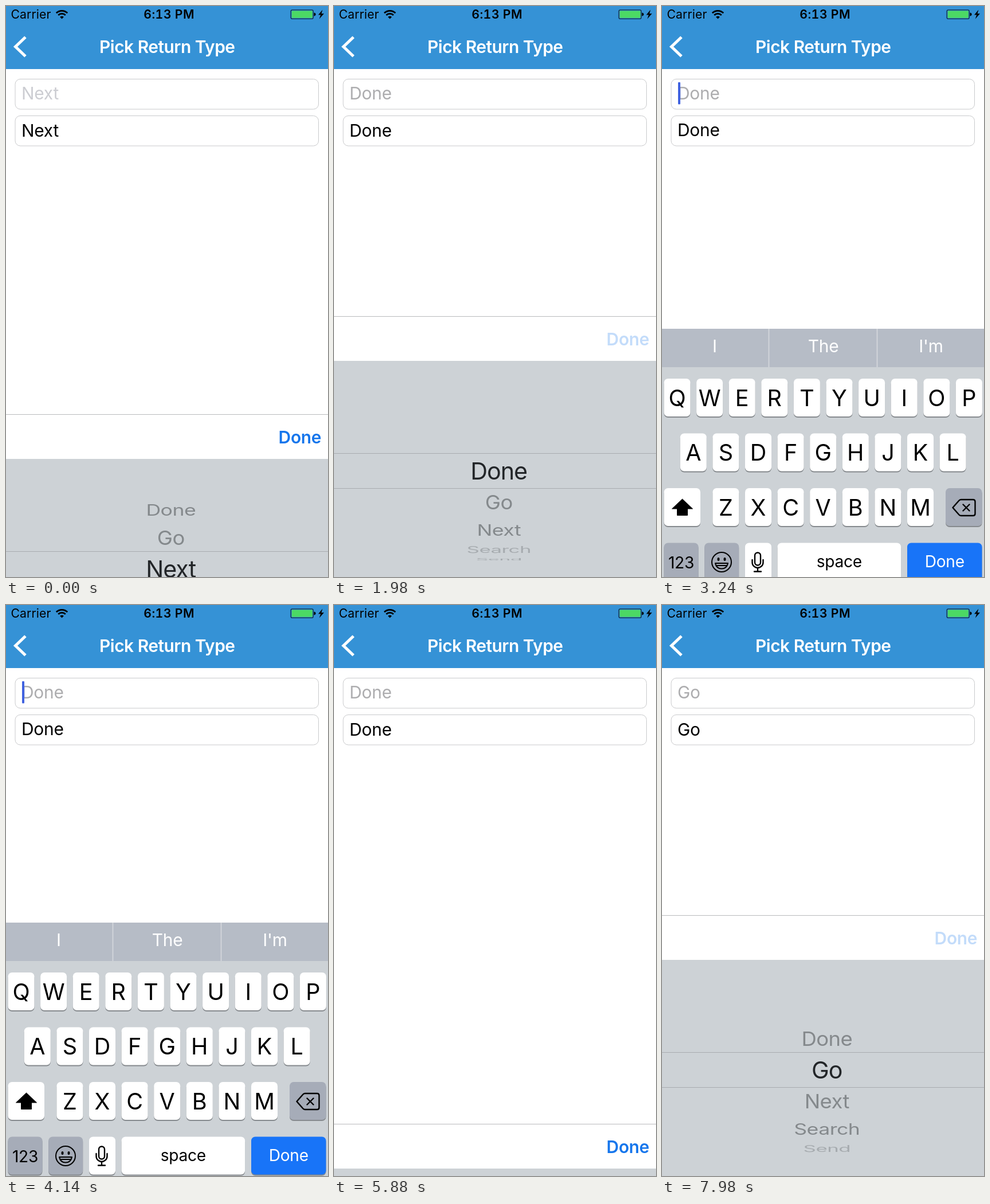
Write an HTML page that moves like this. It is 562x996 px and loops after 8 s.

```html
<!DOCTYPE html>
<html lang="en">
<head>
<meta charset="utf-8">
<title>Pick Return Type</title>
<style>
  html, body { margin: 0; width: 100%; height: 100%; overflow: hidden; background: #fff; }
  svg { display: block; width: 100vw; height: 100vh; font-family: Inter, Roboto, sans-serif; }
  text { font-size: 29.9px; letter-spacing: -.25px; white-space: pre; }
  .mid { text-anchor: middle; }
  .bold { font-weight: 600; }
  .line { fill: none; stroke: #000; stroke-width: 2.4; stroke-linecap: round; stroke-linejoin: round; }
  .field { fill: #fff; stroke: #c9cacc; }
  .wheel text { font-size: 41.2px; letter-spacing: -.6px; fill: #222528; text-anchor: middle; }
  #band text { letter-spacing: -1px; }
  .letter { font-size: 39.5px; letter-spacing: 0; text-anchor: middle; }
  .word { font-size: 28.1px; text-anchor: middle; }
</style>
</head>
<body>
<svg id="stage" viewBox="0 0 562 996" preserveAspectRatio="none">
  <defs>
    <clipPath id="bandClip"><rect y="240" width="562" height="60"/></clipPath>
    <clipPath id="drumClip"><path d="M0 79H562V239H0ZM0 301H562V470H0Z"/></clipPath>
  </defs>
  <rect width="562" height="996" fill="#fff"/>

  <rect width="562" height="110" fill="#3592d6"/>
  <text x="8.5" y="22.3" style="font-size:21.2px;letter-spacing:.1px">Carrier</text>
  <g fill="none" stroke="#000" stroke-width="2.8">
    <path d="M87.8 12.2A14 14 0 0 1 107.2 12.2"/>
    <path d="M91.2 16A9 9 0 0 1 103.8 16"/>
    <path d="M97.5 22.6L94.2 19.2A4.7 4.7 0 0 1 100.8 19.2Z" fill="#000" stroke="none"/>
  </g>
  <text class="mid bold" x="284.6" y="22.3" style="font-size:21.2px;letter-spacing:.4px;font-variant-numeric:tabular-nums">6:13 PM</text>
  <rect x="497.2" y="6.8" width="39" height="15.6" rx="2.5" fill="none" stroke="#122c40" stroke-width="1.3"/>
  <rect x="498.8" y="8.4" width="36" height="12.4" rx="1" fill="#4cd964"/>
  <path d="M537.5 11.5Q540.5 12 540.5 14.6T537.5 17.7Z"/>
  <path d="M552.5 6.5L545 15.6H549.2L546.8 22.6L555 13.2H550.5Z"/>
  <path d="M34 54.3L16.5 71L34 87.7" fill="none" stroke="#fff" stroke-width="5"/>
  <text class="mid bold" x="281.3" y="81.5" fill="#fff" style="letter-spacing:-.5px">Pick Return Type</text>

  <rect class="field" x="16" y="127.5" width="529.5" height="52.5" rx="9"/>
  <rect class="field" x="16" y="191.5" width="529.5" height="52.5" rx="9"/>
  <text id="placeholder" x="27" y="163.3"></text>
  <text id="value" x="27"></text>
  <rect id="caret" x="28" y="133" width="4" height="38.5" rx="1" fill="#4062e0"/>

  <g id="picker">
    <rect width="562" height="79" fill="#fff"/>
    <rect width="562" height="1" fill="#b9bbbd"/>
    <text id="doneButton" class="bold" x="550.3" y="50.5" text-anchor="end" fill="#1676ec">Done</text>
    <rect y="78" width="562" height="460" fill="#cdd2d6"/>
    <path d="M0 239.5H562M0 300.5H562" stroke="#a8acb0"/>
    <g class="wheel" id="drum" clip-path="url(#drumClip)"></g>
    <g class="wheel" id="band" clip-path="url(#bandClip)"></g>
  </g>

  <g id="keyboard">
    <rect width="562" height="450" fill="#cdd2d6"/>
    <rect width="562" height="67" fill="#b6bcc6"/>
    <path d="M186.5 0V67M375.5 0V67" stroke="#d6d9de" stroke-width="1.6"/>
    <g class="mid" fill="#fff">
      <text x="92" y="41.3">I</text><text x="281.5" y="41.3">The</text><text x="469.5" y="41.3">I'm</text>
    </g>
    <g id="keys"></g>
    <path d="M35.5 297L53.5 314H44.5V325.5H26.5V314H17.5Z" stroke="#000" stroke-linejoin="round"/>
    <path class="line" d="M507.5 312L518.5 299.5Q520 298 522 298H543Q546.5 298 546.5 301.5V322.5Q546.5 326 543 326H522Q520 326 518.5 324.5ZM525.5 306.5L536.5 317.5M536.5 306.5L525.5 317.5"/>
    <g transform="translate(104 407)">
      <circle class="line" r="17" style="stroke-width:2"/>
      <ellipse cx="-5.5" cy="-5" rx="2" ry="3"/><ellipse cx="5.5" cy="-5" rx="2" ry="3"/>
      <path class="line" style="stroke-width:2" d="M-11 2H11Q9 11.5 0 11.5T-11 2ZM-9 6H9"/>
    </g>
    <g transform="translate(167 407)">
      <rect class="line" x="-5" y="-16.5" width="10" height="22" rx="5"/>
      <path class="line" d="M-9.5 -4V0.5A9.5 9.5 0 0 0 9.5 0.5V-4M0 10V16M-6 16.5H6"/>
    </g>
  </g>
</svg>
<script>
const byId = id => document.getElementById(id);
const [placeholder, value, caret, picker, doneButton, drum, band, keyboard, keys] =
  ["placeholder", "value", "caret", "picker", "doneButton", "drum", "band", "keyboard", "keys"].map(byId);

function add(parent, tag, attrs, label) {
  const node = document.createElementNS("http://www.w3.org/2000/svg", tag);
  for (const name in attrs) node.setAttribute(name, attrs[name]);
  if (label) node.textContent = label;
  return parent.appendChild(node);
}

const rowTop = row => 87 + 95.5 * row;

function addKey(x, row, width, fill, label, kind = "word", ink = "#000") {
  const y = rowTop(row);
  add(keys, "rect", { x, y: y + 2, width, height: 66, rx: 7, fill: "#868a8e" });
  const face = add(keys, "rect", { x, y, width, height: 66, rx: 7, fill });
  const baseline = y + (kind === "letter" ? 47.8 : 42.7);
  const text = label && add(keys, "text", { class: kind, x: x + width / 2, y: baseline, fill: ink }, label);
  return { face, text };
}

const GREY = "#a6acb8", BLUE = "#1874f8", WHITE = "#fff";
[["QWERTYUIOP", 3.5], ["ASDFGHJKL", 31.8], ["ZXCVBNM", 88.4]].forEach(([letters, left], row) =>
  [...letters].forEach((letter, i) => addKey(left + 56.6 * i, row, 46, WHITE, letter, "letter")));
addKey(3.5, 2, 63.5, WHITE);
addKey(495, 2, 63.5, GREY);
addKey(3.5, 3, 60, GREY, "123").text.setAttribute("y", rowTop(3) + 44.5);
addKey(74.2, 3, 60, GREY);
addKey(145, 3, 46, WHITE);
addKey(201.6, 3, 215.5, WHITE, "space");
const returnKey = addKey(428, 3, 130.5, BLUE, "Done", "word", WHITE);

const items = ["Done", "Go", "Next", "Search", "Send"];
const drumItems = items.map(label => add(drum, "text", { y: 15 }, label));
const bandItems = items.map(label => add(band, "text", { x: 287.7 }, label));

const clamp = (v, lo = 0, hi = 1) => Math.min(hi, Math.max(lo, v));
const ease = (t, from, to) => { const p = clamp((t - from) / (to - from)); return p * p * (3 - 2 * p); };

// Critically damped spring from 0 to 1.
function spring(t, start) {
  const x = Math.max(0, t - start) * 0.01826;
  return 1 - (1 + x) * Math.exp(-x);
}

const WHEEL_CENTER = 270, RADIUS = 156, STEP = 20.6 * Math.PI / 180;

function drawWheel(position) {
  items.forEach((_, i) => {
    const offset = i - position, distance = Math.abs(offset), angle = offset * STEP;
    const scale = 0.905 - 0.02 * distance;
    const y = WHEEL_CENTER + RADIUS * Math.sin(angle);
    const depth = Math.max(0.001, Math.cos(angle));
    drumItems[i].setAttribute("transform", `translate(287.8 ${y}) scale(${scale} ${scale * depth})`);
    drumItems[i].setAttribute("opacity", distance > 4.3 ? 0 : 0.42 - 0.2 * clamp(distance - 2));
    bandItems[i].setAttribute("y", WHEEL_CENTER + 15 + 61 * offset);
  });
}

const LOOP = 8000, TICK = 60;
const FOCUS = 2918, BLUR = 5190, RELEASE = 2040;

function draw(t) {
  const pickerUp = spring(t, -116) - spring(t, RELEASE) + spring(t, 5835);
  picker.setAttribute("transform", `translate(0 ${Math.round(996 - 455 * pickerUp)})`);
  const keyboardUp = spring(t, FOCUS) - spring(t, BLUR);
  keyboard.setAttribute("transform", `translate(0 ${Math.round(996 - 442 * keyboardUp)})`);

  drawWheel(2 - 2 * ease(t, 780, 1500) + ease(t, 6780, 7320));

  const choice = t < 1560 ? "Next" : t < 7380 ? "Done" : "Go";
  placeholder.textContent = value.textContent = choice;
  placeholder.setAttribute("fill", choice === "Next" ? "#cccdd2" : "#adadaf");

  const focused = t >= FOCUS && t < BLUR;
  value.setAttribute("y", focused ? 226.8 : 227.6);
  caret.setAttribute("opacity", focused && (t - FOCUS) % 1000 < 560 ? 1 : 0);

  const pressed = (t >= 1860 && t < RELEASE) || t >= 7860;
  const fading = t >= RELEASE && t < RELEASE + 250;
  doneButton.setAttribute("opacity", pressed ? 0.25 : fading ? 0.25 + 0.75 * (t - RELEASE) / 250 : 1);

  const tapped = t >= 5100 && t < BLUR;
  returnKey.face.setAttribute("fill", tapped ? WHITE : BLUE);
  returnKey.text.setAttribute("fill", tapped ? "#000" : WHITE);
}

const begin = performance.now();
function frame() {
  const t = (performance.now() - begin) % LOOP;
  draw(Math.floor(t / TICK) * TICK);
  requestAnimationFrame(frame);
}
frame();
</script>
</body>
</html>
```
